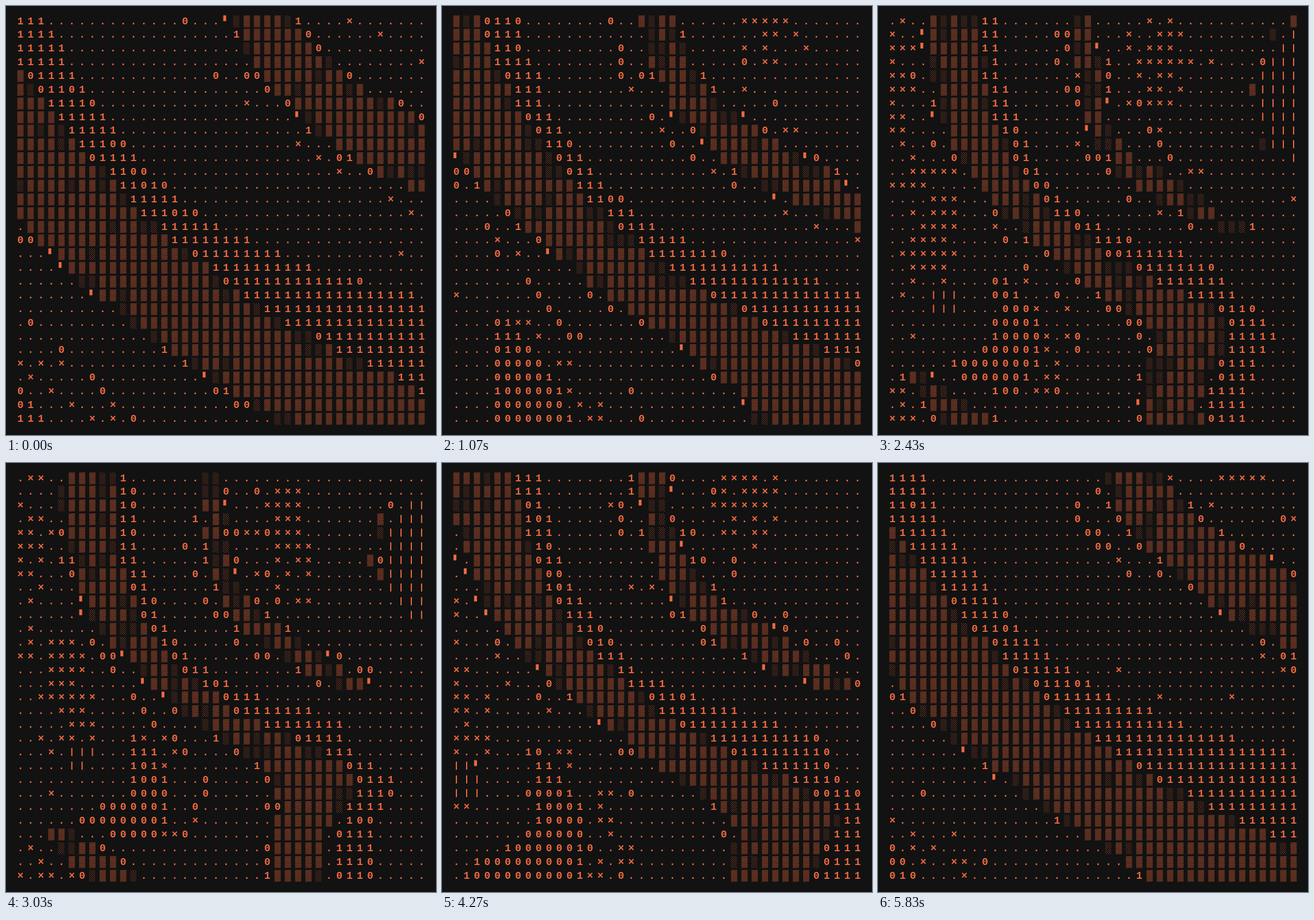
An HTML page with a canvas that plays this animation: 749 by 747 pixels, repeating every 5860 ms.

```html
<!DOCTYPE html>
<html lang="en">
<head>
<meta charset="utf-8">
<title>Glyph field</title>
<style>
html, body { margin: 0; width: 100%; height: 100%; overflow: hidden; background: #121212; }
canvas { display: block; }
</style>
</head>
<body>
<canvas id="stage" width="749" height="747"></canvas>
<script>
const ctx = document.getElementById('stage').getContext('2d');
const COLS = 40, ROWS = 30;
const MX = (COLS - 1) / 2, MY = (ROWS - 1) / 2;
const DX = 17.92, DY = 23.87, X0 = 374.5 - MX * DX, Y0 = 25.8;
const LOOP = 5860, STEPS = 176;
const INK = '#f0693e', PAPER = '#121212';

const rise = (v, mid, width) => 1 / (1 + Math.exp((mid - v) / width));
const bump = (v, mid, width) => Math.exp(-(((v - mid) / width) ** 2));

// Edges of the landscape: x for each height v.
const bandLeft = v => 3.1 + 22.5 * rise(v, 16.5, 3.8) + 3 * bump(v, 22.5, 3.2);
const bandMid = v => bandLeft(v) + 5.2 + 3.4 * bump(v, 21.5, 3.2);
const bandRight = v => bandMid(v) + 2 + 6.5 * bump(v, 17.8, 1.9) + 2.8 * rise(v, 21, 1);
const stripLeft = v => 17.4 + 13.9 * Math.exp((v - 15) / 3.6);
const stripRight = v => stripLeft(v) + 2.2 + 2.8 * bump(v, 12.5, 2.2);
const rootLeft = v => 1.5 + 1.1 * (v - 26);
const rootRight = v => rootLeft(v) + v - 24;
const blobLeft = v => 10 - 5.2 * bump(v, 25.3, 1.2);
const blobRight = v => 14.5 - .15 * (v - 23.7) ** 2;

const strips = [
  { top: -9, end: 15.5, left: stripLeft, right: stripRight },
  { top: 25.5, end: 40, left: rootLeft, right: rootRight }
];

// Faint broken outlines that run beside the edges.
const threads = [
  { top: 4, end: 15.5, line: v => stripLeft(v) - 1.7 },
  { top: 0, end: 15, line: v => stripRight(v) + 3.4 },
  { top: 12.5, end: 27.5, line: v => bandLeft(v) - 1.9 - .55 * (v - 14) }
];

// Clouds of crosses and ovals of bars.
const clouds = [
  { x: 0, y: 4, rx: 1.7, ry: 7 },
  { x: 26.3, y: 3, rx: 2.4, ry: 4.5 },
  { x: 3.8, y: 16, rx: 2.6, ry: 4.2 },
  { x: 1.2, y: 29, rx: 2.3, ry: 1.6 }
];
const ovals = [
  { x: 41, y: 5.6, rx: 5.3, ry: 5.2 },
  { x: 5, y: 20.5, rx: 1.6, ry: 1.1 }
];
const reach = (o, u, v) => Math.hypot((u - o.x) / o.rx, (v - o.y) / o.ry);

function noise(c, r, step, salt) {
  let h = Math.imul(c + 1, 374761393) ^ Math.imul(r + 1, 668265263)
    ^ Math.imul(step + 1, 1274126177) ^ Math.imul(salt, 974634541);
  h = Math.imul(h ^ h >>> 15, 2246822519);
  h = Math.imul(h ^ h >>> 13, 3266489917);
  return ((h ^ h >>> 16) >>> 0) / 4294967296;
}

const shade = (depth, n) => n < .6 * Math.exp(-depth * .75) ? '░' : '▒';

// Loose glyphs just outside a shaded edge; empty when there is none.
function rim(gap, n) {
  if (gap < 1) return n < .45 ? '' : n < .65 ? '0' : n < .85 ? '1' : '▘';
  return gap < 2 && n < .1 ? '0' : '';
}

function glyph(c, r, step, zoom) {
  const u = MX + (c - MX) * zoom, v = MY + (r - MY) * zoom;
  const a = noise(c, r, step, 1), b = noise(c, r, step, 2);
  const wob = (noise(c, r, step, 3) - .5) * .4;
  const past = x => (u - x) / zoom + wob;
  let loose = '', crosses = .003;

  for (const o of ovals) {
    const d = reach(o, u, v);
    if (d < 1) return '|';
    if (d < 1.2 && a < .3) return '░▒0▘'[b * 4 | 0];
  }

  const left = past(bandLeft(v)), mid = past(bandMid(v)), right = past(bandRight(v));
  if (left > 0 && mid < 0) return shade(Math.min(left, -mid), a);
  if (left > 0 && right < 0) {
    const from = v > 24.5 ? Math.min(mid, past(bandRight(v) - 4.1)) : mid;
    if (from < 0) return '.';
    const edge = Math.min(from, -right);
    return a < (edge < 1 ? .3 : right > -2.5 ? .06 : 0) ? '0' : '1';
  }
  if (left <= 0) loose = rim(-left, a);

  for (const s of strips) {
    if (v < s.top || v > s.end) continue;
    const p = past(s.left(v)), q = past(s.right(v));
    if (p > 0 && q < 0) return shade(Math.min(p, -q), a);
    loose = loose || rim(Math.max(-p, q), a);
  }
  if (loose) return loose;

  if (v > 18.6 && v < 27.3) {
    const p = past(blobLeft(v)), q = past(blobRight(v));
    if (p > 0 && q < 0) {
      const ones = v < 20.6 ? .55 : q > -1 ? .65 : p < 1 ? .35 : 0;
      return a < ones ? '1' : '0';
    }
    if (q >= 0) crosses = .5 * bump(u, blobRight(v) + 1.2, 1.2);
  }

  for (const t of threads) {
    if (v > t.top && v < t.end && Math.abs(past(t.line(v))) < .6 && a < .45) {
      return b < .65 ? '0' : '×';
    }
  }

  for (const o of clouds) crosses = Math.max(crosses, Math.exp(-(reach(o, u, v) ** 2)));
  return b < crosses ? '×' : '.';
}

function paint(step) {
  const zoom = .723 - .323 * Math.cos(2 * Math.PI * step / STEPS);
  ctx.fillStyle = PAPER;
  ctx.fillRect(0, 0, 749, 747);
  ctx.fillStyle = INK;
  ctx.font = 'bold 18px "Liberation Mono", "Courier New", monospace';
  ctx.textAlign = 'center';
  ctx.textBaseline = 'alphabetic';
  for (let r = 0; r < ROWS; r++) {
    for (let c = 0; c < COLS; c++) {
      const x = X0 + c * DX, y = Y0 + r * DY;
      const ch = glyph(c, r, step, zoom);
      if (ch === '▘') ctx.fillRect(x - 5, y - 9.5, 5, 10);
      else if (ch === '|') ctx.fillRect(x - 1, y - 7, 2, 14);
      else ctx.fillText(ch, x, y + 5.7);
      if (ch === '▒') {
        ctx.globalAlpha = .1;
        ctx.fillRect(x - 5.4, y - 9.8, 10.8, 20.4);
        ctx.globalAlpha = 1;
      }
    }
  }
}

// Thirty steps a second, on a 10 ms clock.
function stepAt(ms) {
  const rest = ms % 100;
  return Math.floor(ms / 100) * 3 + (rest >= 70 ? 2 : rest >= 30 ? 1 : 0);
}

let shown = -1;
const start = performance.now();
function tick() {
  const step = stepAt((performance.now() - start) % LOOP);
  if (step !== shown) paint(shown = step);
  requestAnimationFrame(tick);
}
tick();
</script>
</body>
</html>
```
